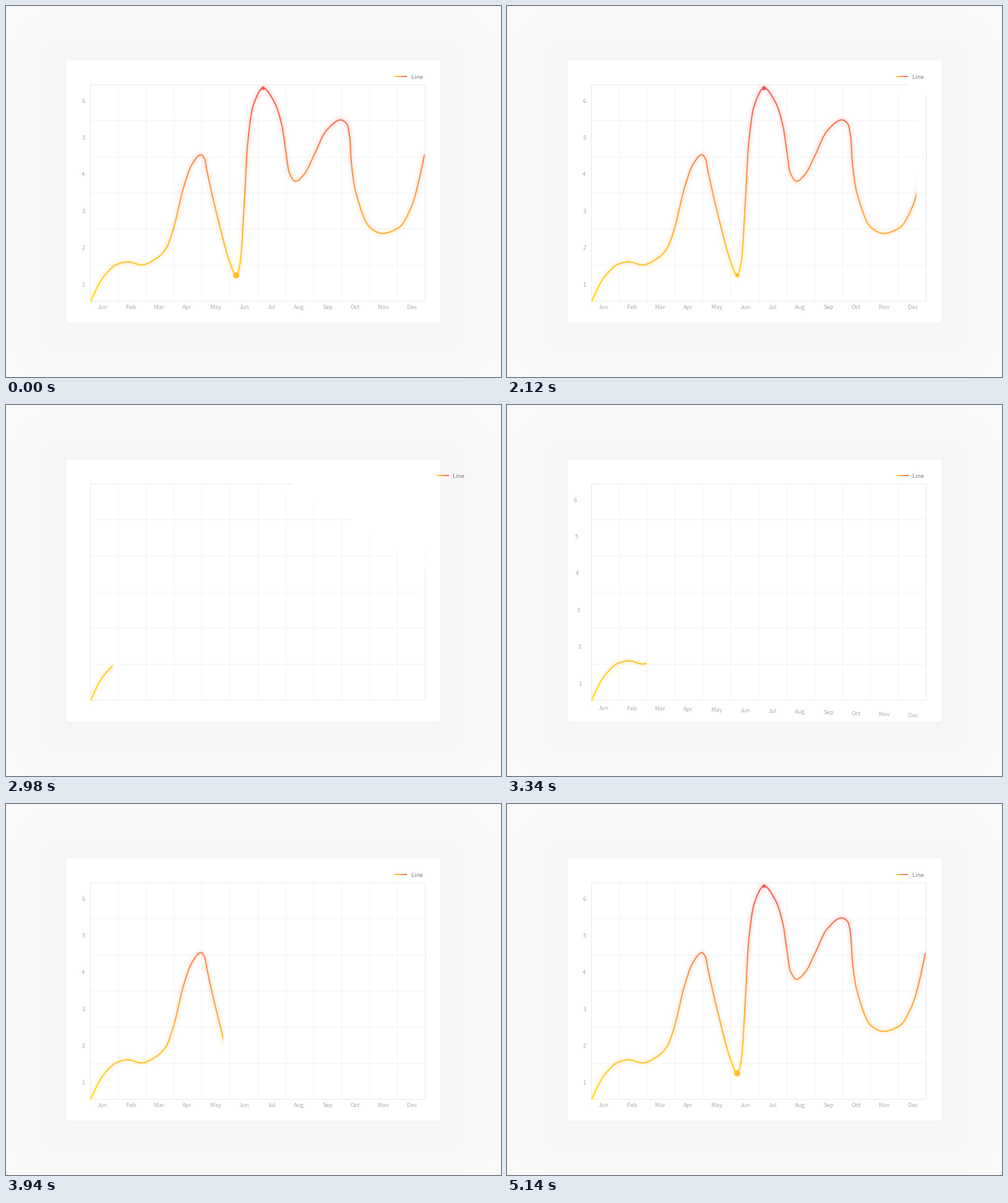
A matplotlib script for the animation above (5180 ms loop, 800 px wide and 600 px high).

```python
import numpy as np
import matplotlib.pyplot as plt
from matplotlib.animation import FuncAnimation
from matplotlib.collections import LineCollection
from matplotlib.patches import Circle, FancyBboxPatch

W, H, DPI = 800, 600, 100
LOOP, STEP = 5180, 20
PX = 72 / DPI
FONT = "Noto Sans CJK JP"

LEFT, RIGHT, TOP, BOTTOM = 136.5, 677.5, 127.5, 477.5
MONTHS = "Jun Feb Mar Apr May Jun Jul Aug Sep Oct Nov Dec".split()
LOW, PEAK = (372, 435.5), (415.5, 132.8)

# turning points and a few points on the slopes between them
KEYS = np.array([
    (137, 477), (158, 437.5), (180, 417.5), (197, 413.7), (219, 418.8),
    (244, 407.5), (259, 391.5), (270, 362), (288, 290), (301, 255.5),
    (315, 240.5), (321, 247.6), (325, 268), (341, 338), (362, 415), LOW,
    (378.5, 415), (386, 302), (390, 228), (399.5, 161), PEAK,
    (434, 156), (446, 194), (452.5, 237), (457.5, 269), (468, 283.5),
    (482, 272), (498, 241), (517, 202.5), (541, 184.2), (551, 191),
    (555.7, 214), (558, 252), (565, 300), (588, 358), (608, 367.8),
    (634, 359), (655, 325), (676, 242)])


def unit(t, start, length):
    return min(max((t - start) / length, 0), 1)


def smooth(u):
    return u * u * (3 - 2 * u)


def ramp(y):
    """Red at the top through orange to yellow at the foot."""
    stops = np.array([(246, 94, 98), (253, 154, 74), (255, 221, 32)])
    at = [PEAK[1], 300, BOTTOM]
    return np.stack([np.interp(y, at, stops[:, c]) for c in range(3)], -1)


def curve_points(n=150):
    """Monotone cubic through KEYS: flat at turns, no overshoot."""
    x, y = KEYS.T
    h, s = np.diff(x), np.diff(y) / np.diff(x)
    m = np.zeros(len(x))
    same = s[1:] * s[:-1] > 0
    m[1:-1][same] = (2 * s[1:] * s[:-1])[same] / (s[1:] + s[:-1])[same]
    m[0], m[-1] = 1.5 * s[0] - 0.5 * m[1], 1.5 * s[-1] - 0.5 * m[-2]
    u = np.linspace(0, 1, n)[:, None]
    px = x[:-1] + h * u
    py = (y[:-1] + smooth(u) * np.diff(y)
          + h * (m[:-1] * u * (1 - u) ** 2 - m[1:] * u * u * (1 - u)))
    return np.column_stack([px.ravel(), py.ravel()])


# ---- pre-rendered rasters -------------------------------------------------
def backdrop():
    y, x = np.mgrid[0:H, 0:W] + 0.5
    dx = np.maximum(np.abs(x - 400) - 302, 0)
    far = np.hypot(dx, np.maximum(np.abs(y - 308) - 212, 0))
    near = np.hypot(dx, np.maximum(np.abs(y - 301) - 212, 0))
    v = 249 - 3.4 * np.exp(-(far / 65) ** 2) - 3 * np.exp(-near / 1.2)
    return np.repeat(v.round().astype(np.uint8)[:, :, None], 3, 2)


CX, CY, CW, CH = 125, 118, 565, 372


def curve_raster():
    dist = np.full((CH, CW), 99.0)
    for px, py in curve_points() - (CX, CY):
        x0, x1 = max(int(px) - 11, 0), min(int(px) + 12, CW)
        y0, y1 = max(int(py) - 11, 0), min(int(py) + 12, CH)
        yy, xx = np.ogrid[y0:y1, x0:x1]
        box = dist[y0:y1, x0:x1]
        np.minimum(box, np.hypot(xx + 0.5 - px, yy + 0.5 - py), out=box)
    core = np.clip(1.55 - dist, 0, 1)
    glow = 0.17 * np.exp(-dist ** 2 / (2 * 3.2 ** 2))
    img = np.empty((CH, CW, 4))
    img[..., :3] = ramp(np.arange(CH) + CY + 0.5)[:, None, :]
    img[..., 3] = 255 * (core + (1 - core) * glow)
    return img.round().astype(np.uint8)


CURVE = curve_raster()
COLS = np.arange(CW) + CX

# ---- stage ----------------------------------------------------------------
fig = plt.figure(figsize=(W / DPI, H / DPI), dpi=DPI)
ax = fig.add_axes([0, 0, 1, 1])
ax.axis("off")


def raster(img, extent, z):
    return ax.imshow(img, extent=extent, origin="upper", aspect="auto",
                     interpolation="nearest", zorder=z)


raster(backdrop(), (0, W, H, 0), 0)
ax.add_patch(FancyBboxPatch((98, 88), 604, 424, fc="white", lw=0, zorder=1,
                            boxstyle="round,pad=0,rounding_size=2.5"))

cols = np.floor(np.linspace(LEFT, RIGHT, 13)) + 0.5
rows = np.floor(np.linspace(BOTTOM, TOP, 7)) + 0.5
shades = [["#e9e9e9"] + ["#f3f3f3"] * (len(g) - 2) + ["#e9e9e9"]
          for g in (cols, rows)]
grid = LineCollection([], linewidths=PX, colors=sum(shades, []), zorder=2,
                      capstyle="butt", snap=False)
ax.add_collection(grid)

line = raster(CURVE, (CX, CX + CW, CY + CH, CY), 3)
low = Circle(LOW, 4.4, fc="#ffc022", lw=0, zorder=4)
peak = Circle(PEAK, 4.4, fc="#fb5658", lw=0, zorder=4)
ax.add_patch(low)
ax.add_patch(peak)


def label(x, y, s, color="#acacac", ha="left"):
    return ax.text(x, y, s, color=color, ha=ha, va="baseline", family=FONT,
                   fontsize=9.4 * PX, zorder=5)


def justified_row(words, x0, x1, y):
    """Words from x0 to x1 with equal gaps between them."""
    texts = [label(0, y, w) for w in words]
    draw_to = fig.canvas.get_renderer()
    widths = [t.get_window_extent(draw_to).width for t in texts]
    gap = (x1 - x0 - sum(widths)) / (len(words) - 1)
    for t, w in zip(texts, widths):
        t.set_x(x0)
        x0 += w + gap
    return texts


months = justified_row(MONTHS, 148, 664.5, 489.5)
values = [label(125, 453.6 - 59.4 * i, str(i + 1), ha="center")
          for i in range(6)]
key_text = label(654.5, 117.5, "Line", "#7c7c7c")
key_ramp = ramp(np.linspace(440, 140, 20))[None].round().astype(np.uint8)
key_line = raster(key_ramp, (628, 648, 115, 113), 5)

ax.set_xlim(0, W)
ax.set_ylim(H, 0)


# ---- motion ---------------------------------------------------------------
def slide(t, leave, out_len, enter, in_len, far_out, far_in):
    """Offset and opacity of a part that eases out, then back in."""
    if t < enter:
        u = unit(t, leave, out_len)
        return far_out * u ** 3, 1 - u * u
    u = unit(t, enter, in_len)
    return far_in * (1 - u) ** 4, unit(t, enter, 70)


def move_labels(t):
    for i, m in enumerate(months):
        off, a = slide(t, 2080 + 8 * i, 310, 3140 + 13 * i, 515, 36, 25)
        m.set_y(489.5 + off)
        m.set_alpha(a)
    for i, v in enumerate(values):
        off, a = slide(t, 2080 + 10 * i, 310, 3189 + 15 * i, 515, -28, -28)
        v.set_x(125 + off)
        v.set_alpha(a)
    off, a = slide(t, 2080, 360, 2890, 600, 130, 130)
    key_text.set_x(654.5 + off)
    key_text.set_alpha(a)
    key_line.set_extent((628 + off, 648 + off, 115, 113))
    key_line.set_alpha(a)
    ax.set_xlim(0, W)
    ax.set_ylim(H, 0)


def grown(t, k):
    """Drawn share of a grid line; k in 0..1 sets its turn."""
    if t < 2500:
        return 1 - smooth(unit(t, 2080 + 90 * (1 - k), 290))
    return smooth(unit(t, 2520 + 260 * k, 350))


def move_grid(t):
    segs = []
    for i, x in enumerate(cols):
        g = grown(t, i / 12)
        segs.append([(x, BOTTOM), (x, BOTTOM + (TOP - BOTTOM) * g)])
    for i, y in enumerate(rows):
        g = grown(t, i / 6)
        segs.append([(LEFT, y), (LEFT + (RIGHT - LEFT) * g, y)])
    grid.set_segments(segs)


def move_line(t):
    if t < 2500:
        p = 1 - smooth(unit(t, 2080, 400))
    else:
        p = unit(t, 2500, 2530) ** 1.64
    edge = 137 + 540 * p
    # the wipe leaves a sliver of glow outside either end
    mask = np.clip(edge - COLS, 0, 1) * (COLS >= 136)
    mask[COLS == 678] = 1
    img = CURVE.copy()
    img[..., 3] = (img[..., 3] * mask).astype(np.uint8)
    line.set_data(img)


def move_dots(t):
    # the pop runs across the loop seam, resting there for a moment
    age = min(t, 5140) - 4600 if t > 4500 else max(t, 40) + 500
    gone = 1 - unit(t, 2080, 160) if t < 4500 else 1
    low.set_radius((4.4 + 1.6 * np.exp(-max(age, 0) / 500)) * gone)
    low.set_alpha(unit(age, -20, 110))
    tau = max(age - 460, 0)
    spring = 1 - np.exp(-tau / 190) * np.cos(2 * np.pi * tau / 500)
    peak.set_radius(4.4 * spring * gone)


def draw(i):
    t = i * STEP
    move_labels(t)
    move_grid(t)
    move_line(t)
    move_dots(t)
    return []


anim = FuncAnimation(fig, draw, frames=LOOP // STEP, interval=STEP,
                     init_func=lambda: draw(0), repeat=True, repeat_delay=0,
                     blit=False)
plt.show()
```
